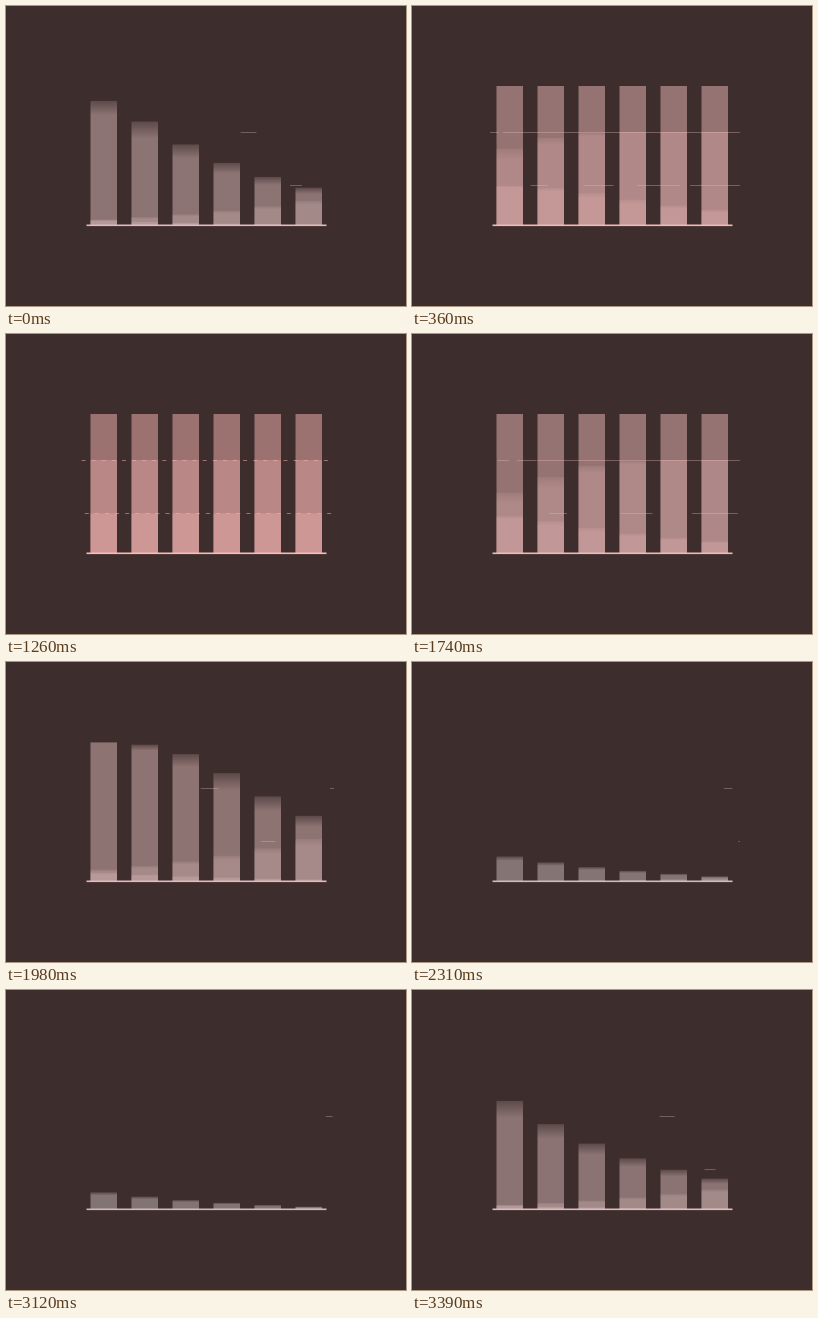
An HTML page with a canvas for the animation above (3420 ms loop, 400 by 300 pixels).

```html
<!DOCTYPE html>
<html lang="en">
<head>
<meta charset="utf-8">
<title>Bars</title>
<style>
  html, body { margin: 0; width: 100%; height: 100%; overflow: hidden; background: #3e2d2d; }
  canvas { display: block; width: 400px; height: 300px; }
</style>
</head>
<body>
<canvas id="stage" width="400" height="300"></canvas>
<script>
const ctx = document.getElementById('stage').getContext('2d');
const LOOP = 3420, STEP = 30, MIRROR = 2062, TURN = 2741;
const BASE = 219, BARS = 6, PITCH = 41, LAG = 37.5, SHUTTER = 27;
const LINE_LEFT = 73, LINE_RIGHT = 328, DASH = 4, PERIOD = 10.1, REST = 75.5;

const clamp = (v, a = 0, b = 1) => Math.min(b, Math.max(a, v));
const mix = (a, b, k) => a + (b - a) * k;

// Cubic bezier easing with flat ends: control points (x1, 0) and (x2, 1)
function ease(x, x1, x2) {
  if (x <= 0) return 0;
  if (x >= 1) return 1;
  let lo = 0, hi = 1;
  for (let i = 0; i < 24; i++) {
    const s = (lo + hi) / 2, r = 1 - s;
    if (3 * s * r * r * x1 + 3 * s * s * r * x2 + s * s * s < x) lo = s;
    else hi = s;
  }
  return lo * lo * (3 - 2 * lo);
}

const rise = u => ease((u + 625) / 711, 0.92, 0.73);
const lead = u => mix(LINE_RIGHT, REST, ease((u + 440) / 840, 0.55, 0.73));

const layers = [
  { height: 139, alpha: 0.49, delay: i => i * LAG },
  { height: 93, alpha: 0.3, delay: i => 193 + (BARS - 1 - i) * LAG },
  { height: 39.5, alpha: 0.3, delay: i => 308 + i * LAG }
];

function tint(tau) {
  const k = clamp((tau + 420) / 1040);
  const rgb = [mix(196, 252, k), mix(191, 186, k), mix(190, 183, k)].map(Math.round);
  return a => `rgba(${rgb},${a})`;
}

function drawBar(i, tau, color) {
  const x = 84.5 + i * PITCH;
  for (const { height, alpha, delay } of layers) {
    const u = tau - delay(i);
    const h = height * rise(u);
    if (h < 0.2) continue;
    const soft = h - height * rise(u - SHUTTER);
    const top = BASE - h;
    if (soft > 0.3) {
      const g = ctx.createLinearGradient(0, top, 0, top + soft);
      g.addColorStop(0, color(alpha * 0.4));
      g.addColorStop(1, color(alpha));
      ctx.fillStyle = g;
    } else {
      ctx.fillStyle = color(alpha);
    }
    ctx.fillRect(x, top, 26.5, h);
  }
}

function drawDashes(y, u, color) {
  const x0 = lead(u), tail = lead(u - SHUTTER) - x0;
  if (x0 > LINE_RIGHT - 0.5) return;
  const period = PERIOD + x0 - REST;
  const drift = Math.max(0, u - 400) / 402 * PERIOD;
  const start = drift > 0 ? x0 - drift % PERIOD : x0;
  ctx.fillStyle = color(0.35 + 0.15 * clamp((u - 360) / 100));
  ctx.beginPath();
  for (let k = 0; start + k * period < LINE_RIGHT; k++) {
    const a = Math.max(LINE_LEFT, start + k * period);
    const b = Math.min(LINE_RIGHT, start + k * period + DASH + tail * (k + 1));
    if (b > a) ctx.rect(a, y, b - a, 1);
  }
  ctx.fill();
}

function draw(t) {
  const tau = t > TURN ? t - LOOP : Math.min(t, MIRROR - t);
  const color = tint(tau);
  ctx.fillStyle = '#3e2d2d';
  ctx.fillRect(0, 0, 400, 300);
  for (let i = 0; i < BARS; i++) drawBar(i, tau, color);
  drawDashes(126, tau, color);
  drawDashes(179, tau - 130, color);
  ctx.fillStyle = color(1);
  ctx.fillRect(80.5, 218.5, 240, 1.6);
}

const began = performance.now();
function tick() {
  const t = (performance.now() - began) % LOOP;
  draw(Math.floor(t / STEP) * STEP);
  requestAnimationFrame(tick);
}
tick();
</script>
</body>
</html>
```
